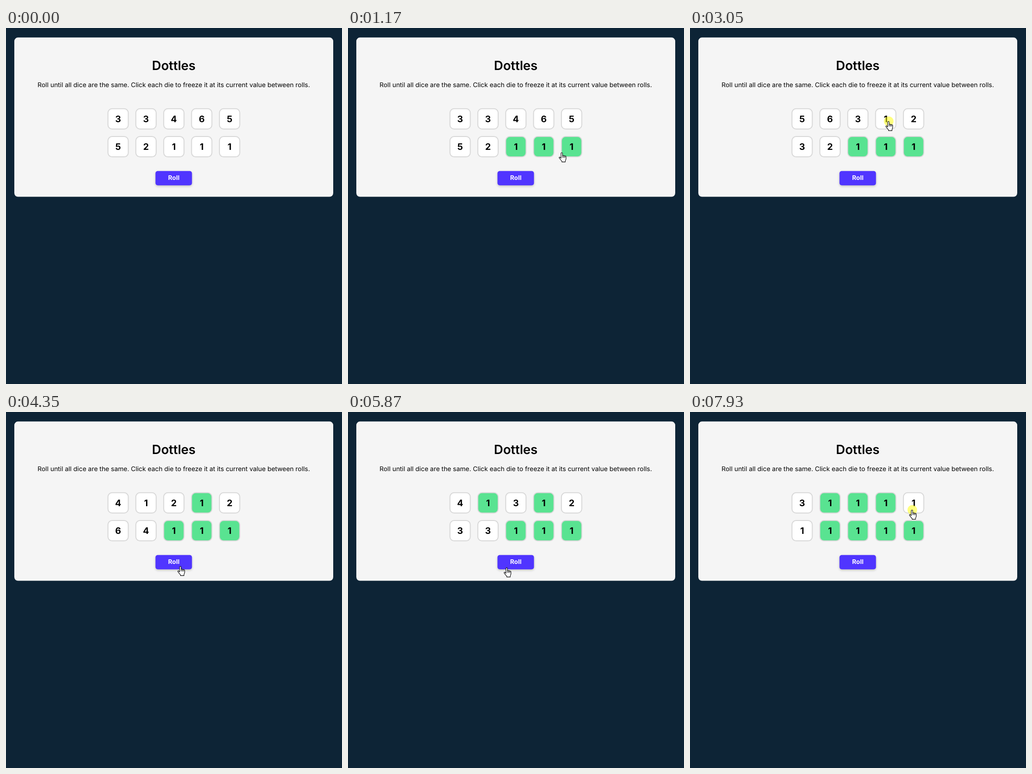
Animation of 727x771 px, one loop 8 s. Source, as an HTML page:

```html
<!DOCTYPE html>
<html lang="en">
<head>
<meta charset="utf-8">
<title>Dice game</title>
<style>
  html, body { margin: 0; width: 100%; height: 100%; overflow: hidden; background: #0d2436; }
  body { position: relative; font-family: Inter, sans-serif; color: #000; text-rendering: geometricPrecision; }
  body * { position: absolute; left: 0; top: 0; box-sizing: border-box; margin: 0; white-space: nowrap; text-align: center; }
  main { width: 690px; height: 345px; border-radius: 8px; background: #f5f5f5; transform: translate(18px, 20.6px); }
  h1 { top: 60.5px; width: 726px; font-size: 27.5px; line-height: 41px; font-weight: 600; }
  p { top: 114px; width: 726px; font-size: 13.86px; line-height: 20px; }
  .die { width: 46px; height: 46px; border: 2px solid #d8d8d8; border-radius: 10px; background: #fff;
    font-size: 19.5px; line-height: 42px; font-weight: 700; }
  .die.held { background: #59e391; }
  #roll { width: 79.4px; height: 31px; border-radius: 5px; background: #5035ff; transform: translate(323.4px, 309.7px);
    color: #fff; font-size: 13.6px; line-height: 31px; font-weight: 700; box-shadow: 0 2px 5px rgba(0,0,0,.22); }
  #roll.down { box-shadow: inset 4px 4px 9px -3px rgba(0,0,0,.7); }
  #pointer { width: 1px; height: 1px; overflow: visible; }
</style>
</head>
<body>
<main></main>
<h1>Dottles</h1>
<p>Roll until all dice are the same. Click each die to freeze it at its current value between rolls.</p>
<div id="roll">Roll</div>
<svg id="pointer">
  <circle id="glow" r="10.5" fill="#ff0" fill-opacity=".5"/>
  <path fill="#fff" stroke="#000" stroke-width="1.1" stroke-linejoin="round" transform="translate(-1 0)"
    d="M-1.3 12.5V1.9a1.6 1.6 0 0 1 3.2 0V7a1.4 1.4 0 0 1 2.6.5a1.4 1.4 0 0 1 2.6.6a1.4 1.4 0 0 1 2.5 1
       v4.2c0 2-1.4 3.2-1.6 5.2v1.9H.6v-1.7C-1.2 17-3 14.5-4.8 12.2c-1.4-2 .6-3 1.9-1.6z
       M1.9 6.5v4.5M4.5 7.5v3.7M7.1 8.2v3.2"/>
</svg>
<script>
const LOOP = 8000, TRAVEL = 380, HOLD = 130;
const PITCH = 60.3, DIE_X = 242.6, DIE_Y = 196.8;

// pointer stops: arrival time, x, y, then the time of each mouse-up there
const stops = [
  [70, 626, 710],
  [480, 367, 253, 690],
  [800, 424, 258, 900],
  [1000, 476, 262, 1100],
  [1420, 374, 323, 1510, 2040, 2180],
  [2990, 430, 202, 3120],
  [3400, 378, 334, 3540, 4080],
  [4730, 307, 205, 4910],
  [5380, 344, 337, 5520, 5870, 6010],
  [6440, 366, 208, 6560],
  [6820, 312, 258, 6960],
  [7250, 352, 327, 7380],
  [7850, 481, 212, LOOP]
];

// first throw, then the free dice of each later one
const throws = ["3346552111", "5263434", "5426336", "5631232", "245245", "412264",
  "45256", "43233", "21551", "311"];

// a mouse-up holds the die under the pointer, or rolls when it is below the dice
const clicks = stops.flatMap(([, x, y, ...ups]) => {
  const col = Math.round((x - DIE_X) / PITCH), row = Math.round((y - DIE_Y) / PITCH);
  return ups.map(up => ({ up, die: row < 2 ? col + 5 * row : null }));
});

const $ = id => document.getElementById(id);
const pointer = $("pointer"), glow = $("glow"), roll = $("roll");
const move = (el, x, y) => el.style.transform = `translate(${x}px, ${y}px)`;

const dice = Array.from({ length: 10 }, (_, i) => {
  const die = document.createElement("div");
  die.className = "die";
  move(die, DIE_X - 23 + i % 5 * PITCH, DIE_Y - 23 + Math.floor(i / 5) * PITCH);
  return document.body.insertBefore(die, pointer);
});

function replay(t) {
  const faces = [...throws[0]], held = new Set();
  let count = 0;
  for (const { up, die } of clicks) {
    if (up > t) break;
    if (die !== null) { held.add(die); continue; }
    const next = [...throws[++count]];
    faces.forEach((_, i) => { if (!held.has(i)) faces[i] = next.shift(); });
  }
  return { faces, held };
}

function position(t) {
  const i = stops.findLastIndex(s => s[0] <= t);
  const from = stops[i], to = stops[i + 1];
  if (!to) return from.slice(1, 3);
  const leave = Math.max(from.length > 3 ? from.at(-1) : from[0], to[0] - TRAVEL);
  const k = Math.max(0, (t - leave) / (to[0] - leave));
  const ease = k * k * (3 - 2 * k);
  return [1, 2].map(n => from[n] + (to[n] - from[n]) * ease);
}

function draw(t) {
  const { faces, held } = replay(t);
  dice.forEach((die, i) => {
    die.textContent = faces[i];
    die.classList.toggle("held", held.has(i));
  });

  const press = clicks.find(({ up }) => t >= up - HOLD && t < up);
  roll.classList.toggle("down", !!press && press.die === null);
  glow.style.display = press ? "" : "none";

  const visible = t >= stops[0][0];
  pointer.style.display = visible ? "" : "none";
  if (visible) move(pointer, ...position(t));
}

const start = performance.now();
function tick() {
  draw((performance.now() - start) % LOOP);
  requestAnimationFrame(tick);
}
tick();
</script>
</body>
</html>
```
